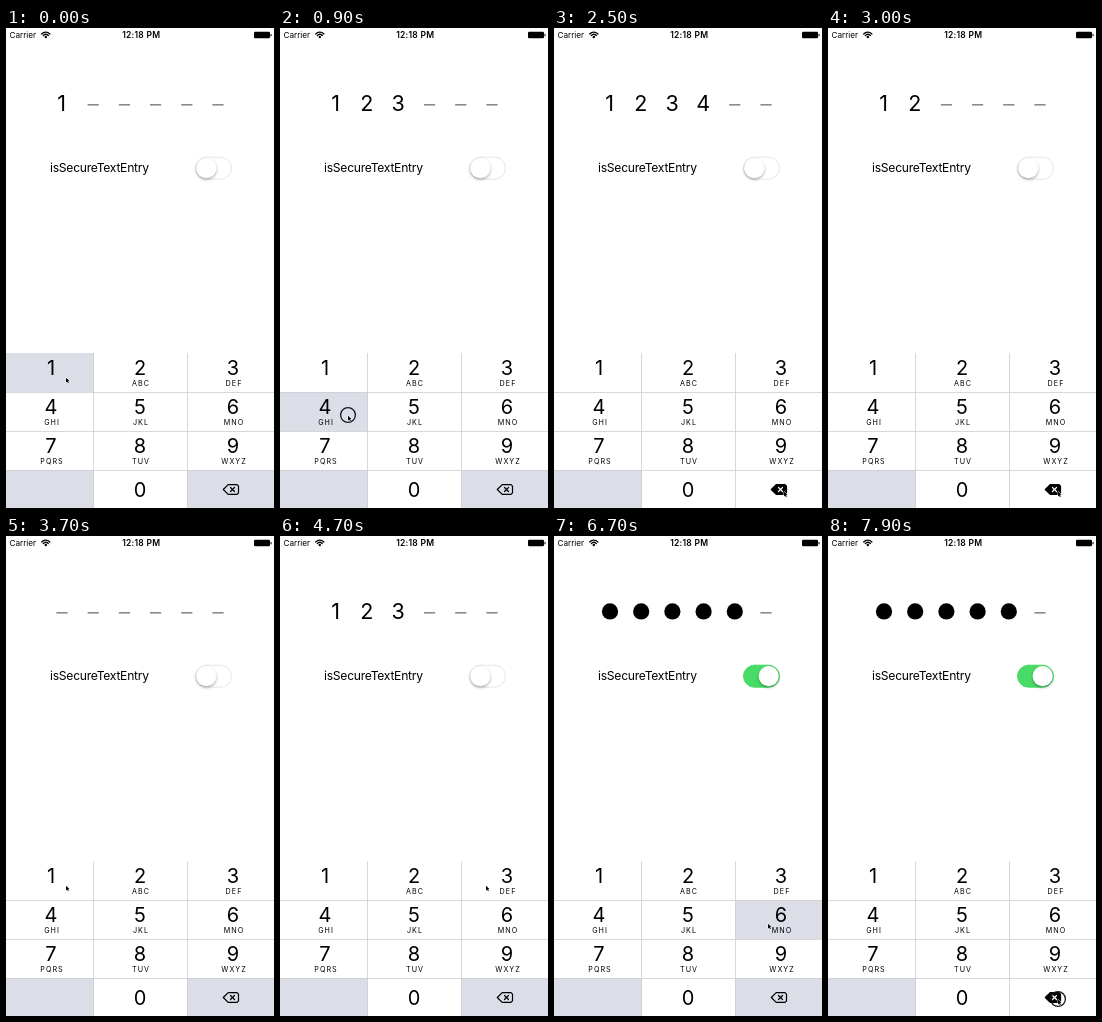
Animation, 268 px wide and 480 px high, one loop 8 s. Source, as an HTML page with a canvas:

```html
<!DOCTYPE html>
<html lang="en">
<head>
<meta charset="utf-8">
<title>Passcode entry</title>
<style>
html, body { margin: 0; width: 100%; height: 100%; overflow: hidden; background: #fff; }
canvas { display: block; width: 268px; height: 480px; }
</style>
</head>
<body>
<canvas id="stage"></canvas>
<script>
const W = 268, H = 480, LOOP = 8000, STEP = 100;
const GREY = '#dbdee7', LINE = '#cecfd2';
const FONT = 'Inter, "Liberation Sans", sans-serif';
const canvas = document.getElementById('stage');
const ctx = canvas.getContext('2d');
const ratio = window.devicePixelRatio || 1;
canvas.width = W * ratio;
canvas.height = H * ratio;
ctx.scale(ratio, ratio);

const TOP = 325, ROW = 39;
const KEYS = '123456789 0<';
const DEL = '<', SWITCH = 's', SWITCH_TIME = 5700;
const colX = [0, 88, 181, W];
const midX = [45, 134, 227];
const letters = ' ABC DEF GHI JKL MNO PQRS TUV WXYZ'.split(' ');

const PRESS = 100, LEAD = 400, TRAVEL = 200;
const burst = (start, gap, keys) =>
  [...keys].map((key, i) => ({ key, down: start + i * gap, up: start + i * gap + PRESS }));

const taps = [
  ...burst(-100, 0, '1'),
  ...burst(300, 300, '23456'),
  ...burst(2150, 250, DEL.repeat(6)),
  ...burst(3800, 200, '123'),
  ...burst(SWITCH_TIME, 0, SWITCH),
  ...burst(6300, 300, '56'),
  ...burst(7200, 0, '9'),
  ...burst(7900, 0, DEL)
];

const clamp = v => Math.max(0, Math.min(1, v));
const ease = v => v * v * (3 - 2 * v);
const mix = (a, b, p) => a + (b - a) * p;

function text(str, x, y, size, { weight = 400, align = 'left', gap = 0 } = {}) {
  ctx.font = `${weight} ${size}px ${FONT}`;
  ctx.letterSpacing = gap + 'px';
  ctx.textAlign = align;
  ctx.fillStyle = '#000';
  ctx.fillText(str, x, y);
}

function rect(x, y, w, h, color) {
  ctx.fillStyle = color;
  ctx.fillRect(x, y, w, h);
}

function disc(x, y, r, color) {
  ctx.fillStyle = color;
  ctx.beginPath();
  ctx.arc(x, y, r, 0, 7);
  ctx.fill();
}

function trace(points) {
  ctx.beginPath();
  points.forEach(([x, y]) => ctx.lineTo(x, y));
}

// Where the pointer rests on a key, drifting right on lower rows
function spot(key) {
  if (key === SWITCH) return [208, 141];
  const i = KEYS.indexOf(key), c = i % 3, r = Math.floor(i / 3);
  return [60 + 73 * c + 8 * r, 349 + 38 * r];
}

// The pointer sets off shortly before each tap, once the last one is released
function pointerAt(t) {
  let [x, y] = spot(taps[0].key);
  for (let i = 1; i < taps.length; i++) {
    const leave = Math.max(taps[i - 1].up, taps[i].down - LEAD);
    const time = Math.min(TRAVEL, taps[i].down - leave);
    const p = ease(clamp((t - leave) / time));
    const [toX, toY] = spot(taps[i].key);
    x = mix(x, toX, p);
    y = mix(y, toY, p);
  }
  return [x, y];
}

// Digits land on release, deletions on touch
function entryAt(t) {
  const out = [];
  for (const { key, down, up } of taps) {
    if (key === DEL) {
      if (t >= down) out.pop();
    } else if (key !== SWITCH && t >= up) {
      out.push(key);
    }
  }
  return out;
}

function drawStatus() {
  text('Carrier', 3.5, 10, 8.2, { gap: -0.05 });
  text('12:18 PM', 135.2, 10, 8.5, { weight: 600, align: 'center', gap: 0.25 });
  ctx.strokeStyle = '#000';
  ctx.lineWidth = 1.3;
  for (const r of [3.4, 5.6]) {
    ctx.beginPath();
    ctx.arc(39.8, 9.8, r, -Math.PI * 0.76, -Math.PI * 0.24);
    ctx.stroke();
  }
  disc(39.8, 9, 1.2, '#000');
  ctx.fillStyle = '#000';
  ctx.beginPath();
  ctx.roundRect(248, 3.8, 16, 6.4, 1.2);
  ctx.fill();
  rect(264.5, 5.9, 1, 2.4, '#000');
}

function drawEntry(entry, secure) {
  for (let i = 0; i < 6; i++) {
    const x = 56 + i * 31.2;
    if (i >= entry.length) rect(x - 5.6, 76, 11.2, 1.6, '#8b8b8b');
    else if (secure) disc(x, 75.4, 8.1, '#000');
    else text(entry[i], x - 0.3, 83.2, 21.5, { align: 'center' });
  }
}

function drawSwitch(p) {
  ctx.beginPath();
  ctx.roundRect(189.5, 129.2, 36, 22, 11);
  ctx.fillStyle = `rgba(73, 219, 103, ${p})`;
  ctx.fill();
  ctx.strokeStyle = p > 0.5 ? '#49db67' : '#e6e6e6';
  ctx.lineWidth = 1;
  ctx.stroke();
  ctx.save();
  ctx.shadowColor = 'rgba(0, 0, 0, 0.3)';
  ctx.shadowBlur = 3 * ratio;
  ctx.shadowOffsetY = 1.5 * ratio;
  disc(mix(200.3, 214.7, p), 140.2, 10.1, '#fff');
  ctx.restore();
}

function drawDelete(pressed) {
  const x = 225, y = 461.5, h = 4.9;
  ctx.lineJoin = ctx.lineCap = 'round';
  ctx.lineWidth = 1.2;
  ctx.strokeStyle = ctx.fillStyle = '#000';
  trace([[x - 7.7, y], [x - 2.8, y - h], [x + 6, y - h], [x + 7.5, y - h + 1.5],
    [x + 7.5, y + h - 1.5], [x + 6, y + h], [x - 2.8, y + h]]);
  ctx.closePath();
  if (pressed) ctx.fill();
  ctx.stroke();
  if (pressed) ctx.strokeStyle = '#fff';
  for (const d of [-2, 2]) {
    trace([[x - 0.5, y - d], [x + 3.5, y + d]]);
    ctx.stroke();
  }
}

function drawPad(held) {
  [...KEYS].forEach((key, i) => {
    const c = i % 3, r = Math.floor(i / 3), y = TOP + r * ROW;
    const grey = key === ' ' || (key === DEL) !== (key === held);
    if (grey) rect(colX[c], y, colX[c + 1] - colX[c], ROW, GREY);
    if (key === DEL) return;
    text(key, midX[c], y + (r < 3 ? 22 : 27), 20, { align: 'center' });
    if (r < 3) text(letters[i], midX[c] + 1, y + 32.8, 7.2, { align: 'center', gap: 1 });
  });
  for (let r = 1; r < 4; r++) rect(0, TOP + r * ROW, W, 0.8, LINE);
  for (const x of [87.2, 181]) rect(x, TOP, 0.8, H - TOP, LINE);
  drawDelete(held === DEL);
}

function drawPointer(x, y, ring) {
  if (ring) {
    ctx.strokeStyle = '#15171c';
    ctx.lineWidth = 1.3;
    ctx.beginPath();
    ctx.arc(x, y, 7.4, 0, 7);
    ctx.stroke();
  }
  ctx.save();
  ctx.translate(x, y + 0.8);
  ctx.scale(0.82, 0.82);
  trace([[0, 0], [0, 5.6], [1.4, 4.5], [2.4, 6.6], [3.4, 6.1], [2.5, 4.1], [4.2, 3.9]]);
  ctx.closePath();
  ctx.lineWidth = 0.9;
  ctx.strokeStyle = '#fff';
  ctx.fillStyle = '#000';
  ctx.stroke();
  ctx.fill();
  ctx.restore();
}

function draw(t) {
  const touch = taps.some(({ down, up }) => t >= down && t < up);
  const held = taps.findLast(({ down, up }) => t >= down && t < up + STEP);
  const slide = ease(clamp((t - SWITCH_TIME) / 300));
  rect(0, 0, W, H, '#fff');
  drawStatus();
  drawEntry(entryAt(t), slide > 0.5);
  text('isSecureTextEntry', 44, 144.2, 12.15, { gap: -0.27 });
  drawSwitch(slide);
  drawPad(held && held.key);
  drawPointer(...pointerAt(t), touch);
}

const start = performance.now();
function tick() {
  const t = (performance.now() - start) % LOOP;
  draw(Math.floor(t / STEP) * STEP);
  requestAnimationFrame(tick);
}
tick();
</script>
</body>
</html>
```
